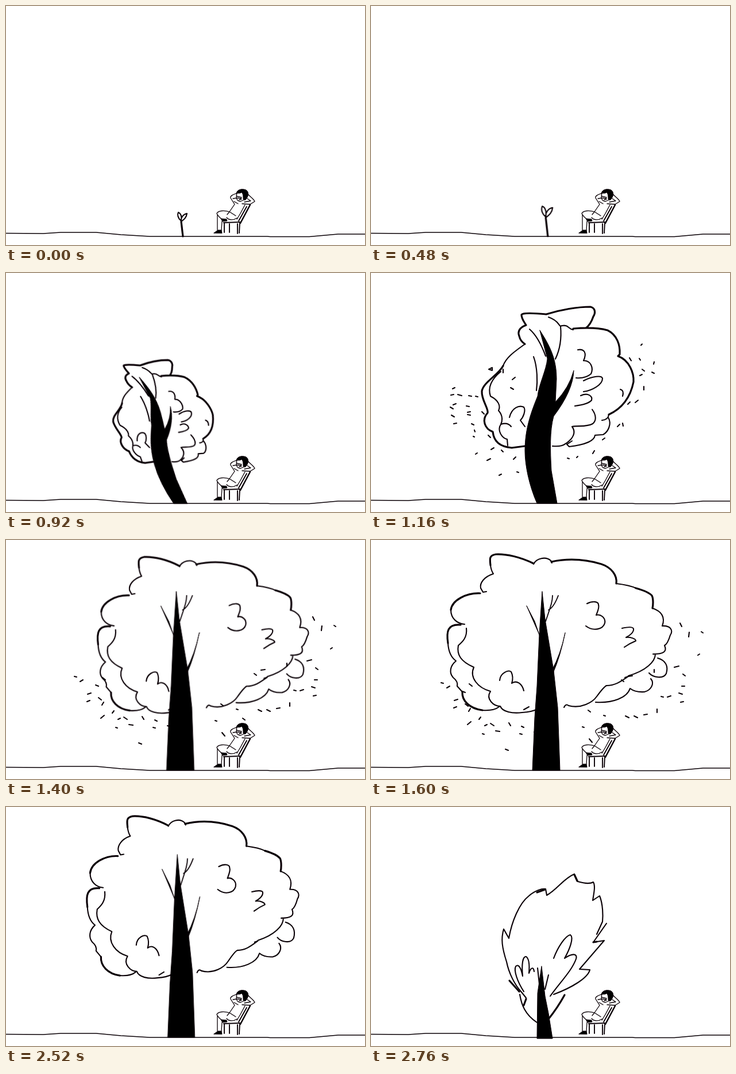
These frames come from a looping animation (625x417 px, 2880 ms). An HTML page:

```html
<!DOCTYPE html>
<html lang="en">
<head>
<meta charset="utf-8">
<title>Growing shade</title>
<style>
html, body { margin: 0; width: 100%; height: 100%; overflow: hidden; background: #fff; }
svg { display: block; width: 100%; height: 100%; fill: none; stroke: #0a0006; stroke-width: 2.1; stroke-linecap: round; stroke-linejoin: round; }
path { vector-effect: non-scaling-stroke; }
.solid { fill: #000; stroke-width: 1; }
.bold { stroke-width: 3.2; }
.fine { stroke-width: 1.3; }

/* Every stage of the tree holds its pose until the next keyframe. */
.stage { opacity: 0; animation: 2880ms step-end infinite; }
.rooted { transform-origin: 309px 403px; }
#sprout { animation-name: sprout; }
#sapling { animation-name: sapling; }
#young { animation-name: young; }
#crown { animation-name: crown; }
#trunk { animation-name: trunk; }
#folding { animation-name: folding; }
#gust { animation-name: gust; }
#driftLeft { animation-name: driftLeft; }
#driftRight { animation-name: driftRight; }

@keyframes sprout {
  0% { opacity: 1; transform: none; }
  16.66% { transform: scale(1.2, 1.25); }
  19.44%, 100% { opacity: 0; }
}
@keyframes sapling {
  0% { opacity: 0; }
  19.44% { opacity: 1; transform: scale(.8, .72); }
  23.61% { transform: none; }
  27.77% { transform: scale(2, 1.9); }
  31.94%, 100% { opacity: 0; }
}
@keyframes young {
  0% { opacity: 0; }
  31.94% { opacity: 1; transform: matrix(.67, 0, .21, .73, 14, 108.8); }
  36.11% { transform: matrix(.87, 0, .09, .88, 3.5, 48.4); }
  40.27% { transform: none; }
  44.44%, 100% { opacity: 0; }
}
@keyframes crown {
  0% { opacity: 0; }
  44.44% { opacity: 1; transform: matrix(.837, 0, 0, .942, 62, 19.4); }
  48.61% { transform: matrix(.94, 0, -.012, .985, 37.5, 5); }
  52.77% { transform: matrix(.97, 0, -.006, .99, 20, 3); }
  54.16% { transform: matrix(.985, 0, 0, 1, 9, 1); }
  55.55% { transform: matrix(1, 0, 0, 1, 1, 0); }
  58.33% { transform: matrix(1.02, 0, 0, 1, -10.5, 0); }
  61.11% { transform: matrix(1.01, 0, 0, 1, -5, 0); }
  63.88% { transform: none; }
  87.49% { transform: matrix(.945, 0, 0, 1.022, 16, -9.5); }
  91.66%, 100% { opacity: 0; }
}
@keyframes trunk {
  0% { opacity: 0; }
  44.44% { opacity: 1; transform: scale(1, .98); }
  48.61% { transform: translate(-1.5px, 0); }
  52.77% { transform: none; }
  87.49% { transform: scale(.98, 1.022); }
  91.66%, 100% { opacity: 0; }
}
@keyframes folding {
  0% { opacity: 0; }
  91.66% { opacity: 1; transform: scale(1.5, 1.2); }
  95.83%, 100% { opacity: 1; transform: none; }
}
@keyframes gust {
  0% { opacity: 0; }
  40.27% { opacity: 1; transform: none; }
  44.44% { transform: matrix(1.12, 0, 0, 1, -38, 4); }
  48.61%, 100% { opacity: 0; }
}
@keyframes driftLeft {
  0% { opacity: 0; }
  48.61% { opacity: 1; transform: none; }
  52.77% { transform: translate(0, 5px); }
  54.16% { transform: translate(2px, 8px); }
  55.55% { transform: translate(3px, 11px); }
  58.33% { transform: translate(4px, 15px); }
  61.11%, 100% { opacity: 0; }
}
@keyframes driftRight {
  0% { opacity: 0; }
  48.61% { opacity: 1; transform: none; }
  52.77% { transform: translate(1px, 5px); }
  54.16% { transform: translate(2px, 8px); }
  55.55% { transform: translate(4px, 11px); }
  58.33% { transform: translate(6px, 16px); }
  61.11% { transform: translate(8px, 22px); }
  63.88%, 100% { opacity: 0; }
}
</style>
</head>
<body>
<svg viewBox="0 0 625 417" preserveAspectRatio="none">
  <path class="fine" d="M0 396.5L65 397L95 395H157L200 399L250 402H455L460 402.5H528L578 398H625"/>

  <g id="sitter" class="fine">
    <path d="M401 327C394 329 390 332 391 335L398 346M402 335L395 336M421 328C425 333 432 337 433 341L425 346L411 345M420 336L426 340L415 342M398 346L389 359M397 341L404 345M416 347L408 362L402 372M367 362C369 357 380 356 389 359L400 366M389 359L385 364M367 362C369 367 374 370 376 373M384 369C388 374 396 374 402 370M368 364V391M376 376L375 391M402 327C400 334 401 340 408 341L415 338M402 332L410 334L409 336L403 335M406 338L410 337"/>
    <path class="solid" d="M401 327C402 320 411 318 418 321C424 325 422 334 416 339L413 337C413 332 413 328 410 325C407 328 404 326 401 327ZM375 371L384 372L385 375L377 376ZM362 396L369 391H375L376 396Z"/>
    <path d="M425 347L408 379" stroke-width="2.5"/>
    <path d="M379 378L409 377M380 379V395M389 380V395M403 380V397M407 378L406 396M419 350L405 375" stroke-width="1.9"/>
  </g>

  <g id="sprout" class="stage rooted">
    <path d="M305 375C299 370 298 364 300 360C305 362 306 368 305 375C304 369 309 363 315 362C314 370 309 373 305 376"/>
    <path class="bold" d="M305 376L308 402"/>
  </g>

  <g id="sapling" class="stage rooted">
    <path d="M295 316C293 325 296 333 300 338C303 345 298 350 300 354C302 358 306 358 310 360M295 316L301 317C313 321 323 334 326 344C329 353 334 356 335 362C337 369 331 367 330 371C329 377 325 374 323 377L318 376M302 319C306 337 324 350 326 345M295 319L299 326"/>
    <path class="solid" d="M301 319C305 334 313 343 317 356C321 367 314 384 315 402H304C303 391 309 384 311 371C313 352 305 340 301 319Z"/>
  </g>

  <g id="young" class="stage">
    <path class="bold" d="M305 72C330 64 360 59 382 59C391 61 391 70 387 76C384 85 380 92 374 96M305 72C285 70 262 69 262 73C262 80 267 86 270 91C258 95 255 103 258 110Q260 119 268 124M352 97C375 95 395 95 412 100C428 108 434 125 433 142L430 145C450 152 458 175 457 190C452 215 440 235 414 247M230 162C222 178 196 190 193 206C192 222 205 236 203 244C192 256 198 272 212 277C214 295 225 303 245 305L268 302"/>
    <path d="M268 124C250 137 235 147 230 162M226 172C210 185 203 200 208 215C222 222 226 232 222 240C231 250 228 260 226 264Q238 260 244 268M241 252C245 235 258 230 266 234C270 240 265 252 260 257L268 268M226 264C219 275 228 288 237 290L238 301M309 77C330 84 326 95 332 92C345 90 342 97 352 99"/>
    <path d="M360 134C372 132 376 140 370 153C382 152 388 165 383 176C376 182 368 184 357 183M370 188C385 180 402 178 403 184C403 195 385 205 370 207M365 214C378 208 386 215 384 222Q378 229 355 232M385 238C393 249 392 258 386 263C376 269 360 266 350 268C356 276 353 284 348 290C336 303 327 303 316 302M414 247Q413 256 402 257M413 252C420 264 412 278 404 282L390 283C389 293 375 299 345 303L341 299L350 293"/>
    <path d="M276 98Q292 112 304 145M330 93Q333 125 321 150M283 146C290 165 290 190 288 205M434 203Q441 205 438 215"/>
    <path class="solid" d="M294 100C312 128 323 150 323 185L321 225Q345 200 353 170Q352 205 318 250C311 275 312 310 314 345L324 402H289C275 370 268 335 268 310C268 270 280 240 290 215C292 195 305 170 307 150Z"/>
  </g>

  <g id="crown" class="stage">
    <path class="bold" d="M282 41C260 30 235 24 216 25C204 27 206 34 207 44M313 38C350 30 380 36 400 42C418 48 428 62 426 76M189 93C165 92 140 105 138 122M155 148C132 146 130 160 133 180M460 84Q482 90 488 97C491 103 490 115 489 119M158 265C157 280 170 294 193 297"/>
    <path d="M207 44Q208 53 212 59C196 64 188 75 190 84L194 91L200 90M138 122C138 138 150 146 162 147M133 180C134 198 140 206 147 211C136 220 135 232 142 240Q151 247 149 255L158 265M193 297C207 298 217 295 222 291M165 154C167 170 158 178 151 184C148 200 155 212 178 222C170 240 185 258 207 264C198 278 213 290 224 290C228 300 245 303 262 301Q279 300 289 295M265 296L274 291"/>
    <path d="M282 42C287 32 303 28 312 36L314 40M426 76Q450 79 460 84M489 119C504 124 512 134 506 150C522 149 525 159 520 166C517 176 514 182 510 184C515 195 508 199 490 199M494 199C494 212 478 228 447 237M498 206C512 210 517 220 513 233C508 243 490 240 483 232M486 242C493 250 487 262 475 265Q459 266 450 259C445 275 420 285 390 283M335 292Q338 285 343 289C365 295 385 283 392 273C400 262 405 256 409 254C425 254 435 246 447 238L441 240"/>
    <path d="M375 111C385 106 395 107 395 113C397 118 393 126 391 131C398 129 408 135 406 145C403 156 386 160 373 150M436 154C445 152 455 151 456 155C457 161 449 167 443 170C450 169 460 172 460 176Q450 180 440 187M223 245C224 232 238 226 243 230C247 238 246 244 244 250C252 244 262 250 265 263"/>
  </g>

  <g id="trunk" class="stage rooted">
    <path class="solid" d="M298 90L303 138L318 228L325 292L329 402H281L285 310L289 255L293 165ZM271 115L285 142L296 174L292 163ZM338 162Q330 202 317 232L315 227Q330 200 338 162Z"/>
    <path d="M316 97C316 108 312 118 304 142M326 97Q318 118 309 122" stroke-width="1.8"/>
  </g>

  <g id="folding" class="stage rooted">
    <path d="M240 229C245 200 258 168 275 155C285 146 298 142 304 143L306 154C325 143 335 125 354 117L360 130C370 133 380 135 387 131C391 138 388 150 386 163L398 155C404 170 404 190 403 200L393 222M410 203L387 236L406 233L363 283L381 284C378 298 350 315 318 327M240 229L231 213C226 230 228 245 236 270C240 290 250 310 262 323L270 333M259 327C262 345 268 362 289 376"/>
    <path d="M266 322C255 305 248 285 252 278C258 272 262 285 264 295C262 275 264 260 270 261C276 265 276 278 275 290C278 280 283 278 284 287M318 264C325 245 338 225 347 223C354 228 345 250 337 264C350 255 360 255 357 265C350 285 330 305 312 330M290 281L294 318M309 293L303 318"/>
    <path class="bold" d="M354 118L359 129M289 149L303 144M387 236L393 235M241 303L258 322M337 328Q325 350 309 370M270 335L266 346"/>
    <path class="solid" d="M297 278L303 330L309 360L316 404H289L290 325Z"/>
  </g>

  <g id="gust" class="stage">
    <path d="M205 168l6-3v5zM142 202l4-2M139 213l5-1M151 212l7 2M170 214l5 1M182 215l4 1M143 230l5-2M166 232l5 1M138 234l5 3M168 243l5-1M140 248l5 3M144 263l5-1M168 247l5 1M193 242l4 4M175 263l4 2M180 274l1 3M178 285l2 1M204 283l4 4M209 308l5-3M182 316l3-2M202 327l6-3M227 309l3 3M248 325l4-4M223 353l4-2M254 347l3 1"/>
    <path d="M470 126l2-2M467 149l2 3M493 155l-1 4M489 173l4 2M472 168l4 3M450 148l3 5M468 179l4-2M475 198v6M460 226l5-4M447 229l4-4M438 262l1 5M429 268l4-4M403 291l4-3M386 315l3-5M358 322l2-2M342 323l3 1M230 168v6M246 186l5-4M243 200l5 3"/>
  </g>

  <g id="driftLeft" class="stage">
    <path d="M119 238l4 1M129 247l5-3M156 253l5 2M168 240l5 4M142 269l6-2M141 282l5-2M161 275l5 4M167 288l3-5M185 302l3-4M165 311l6-5M195 313l4-2M205 309l6 4M214 322l7 1M191 327l3 1M231 354l5 2M237 308l3 5M259 314l4 2M256 327l4 1M281 324l3 1"/>
  </g>
  <g id="driftRight" class="stage">
    <path d="M534 134l3 6M550 150l-1 8M571 149l3 2M565 190l3-2M524 211l8-2M539 223l4 3M537 244h5M512 263l6-2M501 262l4 1M532 256l6 2M535 272l5-1M494 284v6M471 294l6-1M454 296l6 3M439 296l6 3M401 295l3 1M412 311l4 3M376 336l5 6M364 315l3 1M374 286l4 3M432 233l4 3M444 227l7-1M489 215v5"/>
  </g>
</svg>
</body>
</html>
```
